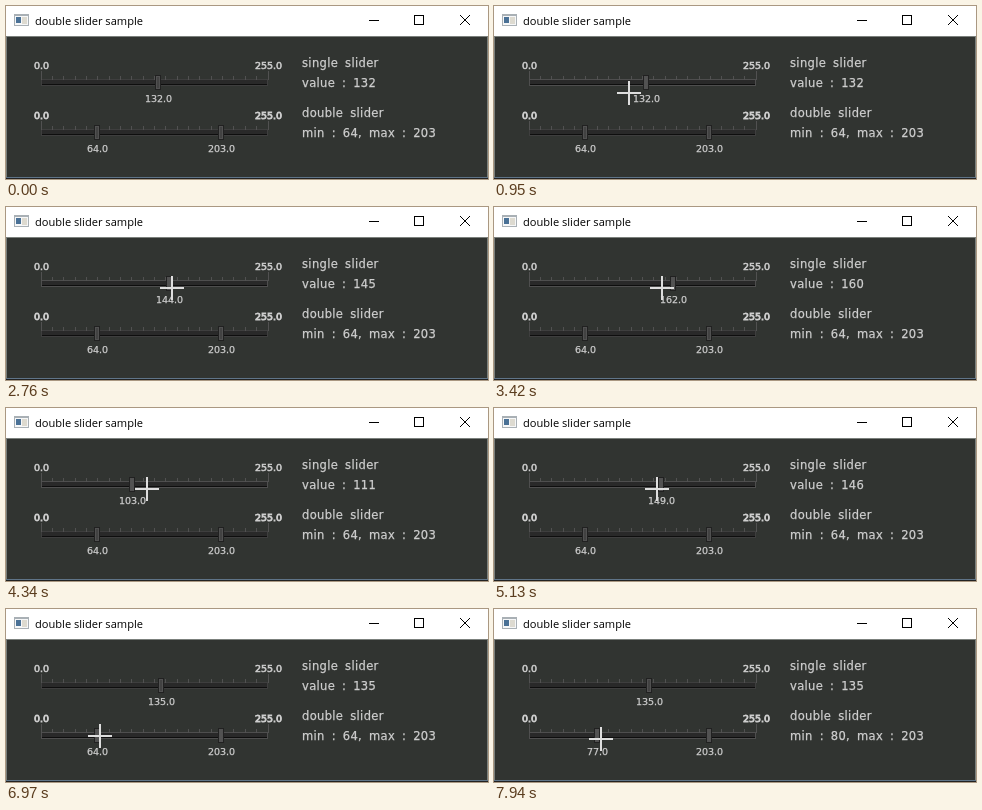
Animation, 482 px wide and 173 px high, one loop 7990 ms. Source, as an HTML page with a canvas:

```html
<!DOCTYPE html>
<html lang="en">
<head>
<meta charset="utf-8">
<title>double slider sample</title>
<style>
  html, body { margin: 0; width: 482px; height: 173px; overflow: hidden; background: #fff; }
  canvas { display: block; }
</style>
</head>
<body>
<canvas id="stage" width="482" height="173"></canvas>
<script>
const ctx = document.getElementById('stage').getContext('2d');
const LOOP = 7990, STEP = 45;
const LEFT = 35, SPAN = 227, MAX = 255;
const TEXT_LAG = .8, HANDLE_LAG = 1.5;   // in steps behind the pointer

// Each move eases out from where the previous one stopped.
const entry = { x: -12, y: 114 };
const moves = [
  { start: 590, time: 560, x: 145, y: 85, ease: 2 },
  { start: 1330, time: 130, x: 150, y: 80, ease: 2 },
  { start: 2350, time: 870, x: 180, y: 81, ease: 1, drag: 'single' },
  { start: 3420, time: 640, x: 122, y: 80, ease: 3, drag: 'single' },
  { start: 4290, time: 410, x: 177, y: 82, ease: 1.7, drag: 'single' },
  { start: 4980, time: 330, x: 156, y: 81, ease: 1.3, drag: 'single' },
  { start: 5900, time: 710, x: 94, y: 127, ease: 2 },
  { start: 7760, time: 180, x: 107, y: 130, ease: .75, drag: 'min' },
];

const toValue = x => Math.floor((x - LEFT) * MAX / SPAN);
const toX = value => LEFT + Math.floor(value * SPAN / MAX);

function stateAt(t) {
  const state = { pointer: null, text: { single: 132, min: 64 }, handle: { single: 132, min: 64 } };
  let from = entry;
  for (const move of moves) {
    if (t < move.start) break;
    const step = Math.floor((t - move.start) / STEP + .001) + 1;
    const at = (axis, lag = 0) => {
      const u = Math.min(1, Math.max(0, (step - lag) / Math.round(move.time / STEP)));
      return move[axis] + (from[axis] - move[axis]) * (1 - u) ** move.ease;
    };
    state.pointer = { x: Math.round(at('x')), y: Math.round(at('y')) };
    if (move.drag) {
      state.text[move.drag] = toValue(at('x', TEXT_LAG));
      state.handle[move.drag] = toValue(at('x', HANDLE_LAG));
    }
    from = move;
  }
  return state;
}

function rect(color, x, y, w, h) {
  ctx.fillStyle = color;
  ctx.fillRect(x, y, w, h);
}

function write(text, x, y, { font = '11.5px "DejaVu Sans", sans-serif', color = '#cecece',
                             align = 'left', spacing = 0, words = 0, weight = .25 } = {}) {
  ctx.font = font;
  ctx.textAlign = align;
  ctx.letterSpacing = spacing + 'px';
  ctx.wordSpacing = words + 'px';
  ctx.fillStyle = ctx.strokeStyle = color;
  ctx.fillText(text, x, y);
  if (weight) {
    ctx.lineWidth = weight;
    ctx.strokeText(text, x, y);
  }
}

const info = (text, y) => write(text, 296, y, { spacing: .35, words: 2.9 });
const number = (value, y, weight) => write(value.toFixed(1), toX(value) + .5, y,
  { font: '9.5px "DejaVu Sans", sans-serif', align: 'center', weight });

function windowFrame() {
  rect('#fff', 0, 0, 482, 30);
  rect('#7b807c', 0, 30, 482, 142);
  rect('#313431', 1, 31, 480, 140);
  rect('#5f7488', 0, 171, 482, 1);
  rect('#222', 0, 172, 482, 1);

  rect('#a9b0b5', 8, 8, 15, 12);
  rect('#f6f7f8', 9, 10, 13, 9);
  rect('#4a7196', 10, 11, 5, 6);
  rect('#dddad0', 16, 11, 5, 7);
  write('double slider sample', 29, 19,
    { font: '11.1px "Open Sans", sans-serif', color: '#000', weight: 0 });

  rect('#000', 363, 14, 10, 1);
  ctx.strokeStyle = '#000';
  ctx.lineWidth = 1;
  ctx.strokeRect(408.5, 9.5, 9, 9);
  ctx.beginPath();
  ctx.moveTo(454, 9);
  ctx.lineTo(464, 19);
  ctx.moveTo(464, 9);
  ctx.lineTo(454, 19);
  ctx.stroke();
}

function slider(y, values, pointer, endWeight) {
  const over = pointer && pointer.x > 20 && Math.abs(pointer.y - y) < 23;
  rect(over ? '#4e4e4e' : '#3e3e3e', LEFT, y, SPAN, 7);
  rect('#292929', LEFT + 1, y + 1, SPAN - 2, 5);
  rect('#0e0e0e', LEFT + 1, y + 5, SPAN - 2, 1);
  for (let i = 0; i <= 20; i++) {
    const height = i % 20 ? 3 : 8;
    rect('#515151', toX(MAX * i / 20), y - height, 1, height + 1);
  }
  number(0, y - 10, endWeight);
  number(MAX, y - 10, endWeight);
  for (const value of values) {
    const x = toX(value);
    rect('#212121', x - 3, y - 4, 6, 15);
    rect('#515151', x - 2, y - 3, 4, 13);
    rect(over ? '#525252' : '#424242', x - 1, y - 2, 2, 11);
    number(value, y + 23);
  }
}

function draw(t) {
  const { pointer, text, handle } = stateAt(t);
  windowFrame();
  slider(73, [handle.single], pointer, .6);
  slider(123, [handle.min, 203], pointer, .9);
  info('single slider', 61);
  info(`value : ${text.single}`, 81);
  info('double slider', 111);
  info(`min : ${text.min}, max : 203`, 131);
  if (pointer) {
    rect('#dedede', pointer.x - 12, pointer.y - 1, 24, 2);
    rect('#dedede', pointer.x - 1, pointer.y - 12, 2, 24);
  }
}

const begin = performance.now();
function tick() {
  draw((performance.now() - begin) % LOOP);
  requestAnimationFrame(tick);
}
tick();
</script>
</body>
</html>
```
